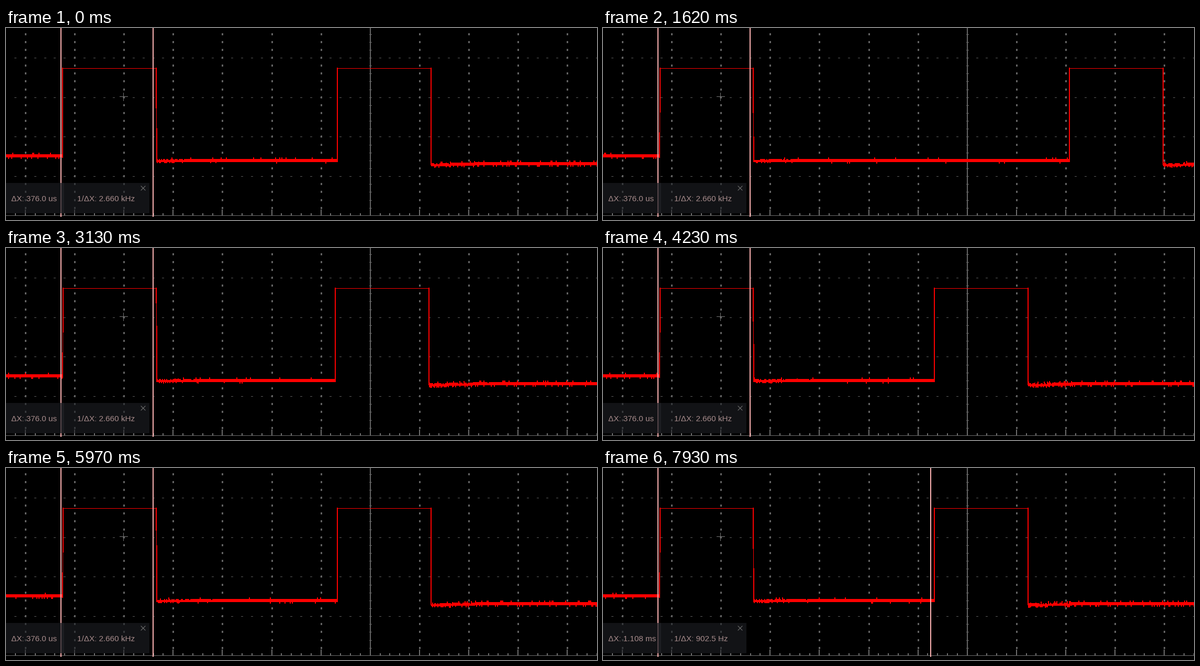
These frames come from a looping animation (1129x368 px, 8000 ms). A matplotlib script:

```python
import numpy as np
import matplotlib.pyplot as plt
from matplotlib.animation import FuncAnimation
from matplotlib.collections import PolyCollection

W, H, DPI = 1129, 368, 100
LOOP, DT = 8000, 40
DIV_X, DIV_Y = 94.1, 75.7
PULSE, TOP = 179, 77
RED, PINK, INK = "#ff0000", "#ffb4b4", "#a68b8b"

# (first update, last update, count) of each burst of sweeps, in ms
BURSTS = [(100, 190, 2), (430, 530, 2), (750, 960, 3), (1180, 1180, 1),
          (1390, 1620, 3), (1840, 1940, 2), (2150, 2270, 2), (2480, 2600, 2),
          (2820, 3130, 4), (3270, 4010, 8), (4110, 4870, 8), (4990, 5750, 8),
          (5870, 6640, 8), (6730, 7500, 8), (7610, 7930, 4)]
SWEEPS = np.concatenate([[0]] + [np.linspace(*b) for b in BURSTS])

# time and x keys of the second pulse and of the moving cursor
PULSE_T = [530, 750, 960, 1180, 1390, 1620, 1840, 2270, 2480, 2600, 2820, 2925, 3030, 3130, 3400]
PULSE_X = [633, 645, 712, 795, 858, 891, 893, 893, 855, 800, 705, 662, 636, 629, 633]
CURSOR_T = [6000, 6200, 6420, 6640, 6840, 6950, 7170, 7400, 7610, 7820]
CURSOR_X = [281, 318, 398, 486, 553, 578, 604, 617, 624, 626]

fig = plt.figure(figsize=(W / DPI, H / DPI), dpi=DPI, facecolor="black")
ax = fig.add_axes([0, 0, 1, 1])
ax.set_xlim(0, W)
ax.set_ylim(H, 0)
ax.axis("off")


def rects(x0, x1, y0, y1):
    """Corner arrays of one or many rectangles."""
    x0, x1, y0, y1 = np.broadcast_arrays(*(np.atleast_1d(v).astype(float)
                                           for v in (x0, x1, y0, y1)))
    return np.stack([np.stack([x0, y0], -1), np.stack([x1, y0], -1),
                     np.stack([x1, y1], -1), np.stack([x0, y1], -1)], 1)


def boxes(verts, color, z, alpha=None):
    art = PolyCollection(verts, facecolors=color, linewidths=0,
                         antialiaseds=False, zorder=z, alpha=alpha)
    ax.add_collection(art)
    return art


def draw_grid():
    cols = np.round(37 + DIV_X * np.arange(12)).astype(int)
    rows = np.round(57 + DIV_Y * np.arange(4)).astype(int)
    xs = np.round(37 + DIV_X / 5 * np.arange(-1, 59)).astype(int)
    ys = np.round(57 + DIV_Y / 5 * np.arange(-3, 20)).astype(int)

    cx, cy = np.meshgrid(cols[cols != 696], ys)
    boxes(rects(cx.ravel() - 1, cx.ravel() + 2, cy.ravel() - 2, cy.ravel() + 2), "#626262", 1)
    rx, ry = np.meshgrid(xs, rows)
    boxes(rects(rx.ravel() - 2, rx.ravel() + 2, ry.ravel(), ry.ravel() + 1), "#5c5c5c", 1)

    boxes(rects(695, 697, 0, 360), "#666666", 1)
    boxes(rects(694, 699, ys, ys + 1), "#666666", 1)
    boxes(rects(0, W, 359, 360), "#6e6e6e", 1)
    boxes(rects(xs - 1, xs + 1, 355, 359), "#6e6e6e", 1)
    boxes(rects(cols - 1, cols + 1, 348, 359), "#6e6e6e", 1)
    boxes(np.concatenate([rects(217, 233, 131, 132), rects(224, 225, 124, 140)]), "#777777", 1)


def draw_panel():
    boxes(rects(0, 274, 297, 355), "#1e2025", 5, 0.62)
    boxes(rects(104, 111, 297, 355), "#2c2d32", 5, 0.4)
    for y0, y1 in ((303, 311), (311, 303)):
        ax.plot([258, 266], [y0, y1], color="#777777", lw=0.75, zorder=6)


def label(x):
    return ax.text(x, 332, "", color=INK, family="Liberation Sans",
                   size=15.2 * 72 / DPI, va="baseline", zorder=6)


def band(rng, x0, x1, mid, ragged, up, down):
    """Noisy flat level: a thick line with random notches and spikes."""
    if x1 <= x0:
        return np.empty((0, 4, 2))
    x = np.arange(x0, x1, 2)
    end = np.minimum(x + 2, x1)
    d = x - x0
    a, b, c, e = rng.random((4, len(x)))
    notch = ragged * np.exp(-(d / 60.0) ** 2)
    y = np.round(mid(d)) if callable(mid) else np.full(len(x), mid)
    top = y - 3 + 2 * (a < notch) - 3 * (b < up)
    bottom = y + 3 + 2 * (c < notch) + 3 * (e < down * (c >= notch))
    return rects(x, end, top, bottom)


def trace(step, t):
    rng = np.random.default_rng(500 + step)
    p = int(round(np.interp(t, PULSE_T, PULSE_X)))
    q = p + PULSE
    split = int(rng.integers(92, 186))
    thin = split + int(rng.integers(28, 47))
    parts = [
        band(rng, 0, 108, 245, 0.0, 0.05, 0.14),
        rects(109, 287, TOP, TOP + 1),
        # falling edge of the first pulse
        rects(286, 288, TOP - 1, split),
        rects(287, 288, split, thin),
        rects(287, 289, thin, 257),
        band(rng, 288, p, 254, 0.5, 0.05, 0.03),
        # second pulse
        rects(p - 1, p + 1, TOP - 1, 257),
        rects(p, q, TOP, TOP + 1),
        rects(q - 1, q + 1, TOP - 1, 263),
        band(rng, q, W, lambda d: 260 + 2 * np.exp(-(d / 70) ** 2), 0.35, 0.17, 0.2),
    ]
    if step == 0:
        parts.append(rects(107, 109, TOP - 1, 249))
    else:
        parts += [rects(108, 110, TOP - 1, 162), rects(108, 109, 162, 200),
                  rects(107, 109, 200, 249)]
    return np.concatenate(parts)


def readout(x):
    us = 4 * round((x - 104) * 2.124 / 4)
    span = f"{us:.1f} us" if us < 1000 else f"{us / 1000:.3f} ms"
    freq = 1e6 / us
    rate = f"{freq / 1000:.3f} kHz" if freq >= 1000 else f"{freq:.1f} Hz"
    return f"ΔX: {span}", f"1/ΔX: {rate}"


draw_grid()
draw_panel()
wave = boxes(rects(0, 1, 0, 1), RED, 3)
boxes(rects(104, 106, 0, 362), PINK, 4)
cursor = boxes(rects(280, 282, 0, 362), PINK, 4)
span_text, rate_text = label(10), label(136)


def update(i):
    now = i * DT + 30
    step = int(np.searchsorted(SWEEPS, now, side="right")) - 1
    t = SWEEPS[step]
    x = int(round(np.interp(t, CURSOR_T, CURSOR_X)))
    wave.set_verts(trace(step, t))
    cursor.set_verts(rects(x - 1, x + 1, 0, 362))
    for art, text in zip((span_text, rate_text), readout(x)):
        art.set_text(text)
    return wave, cursor, span_text, rate_text


anim = FuncAnimation(fig, update, frames=LOOP // DT, interval=DT,
                     repeat=True, repeat_delay=0, blit=False)
plt.show()
```
